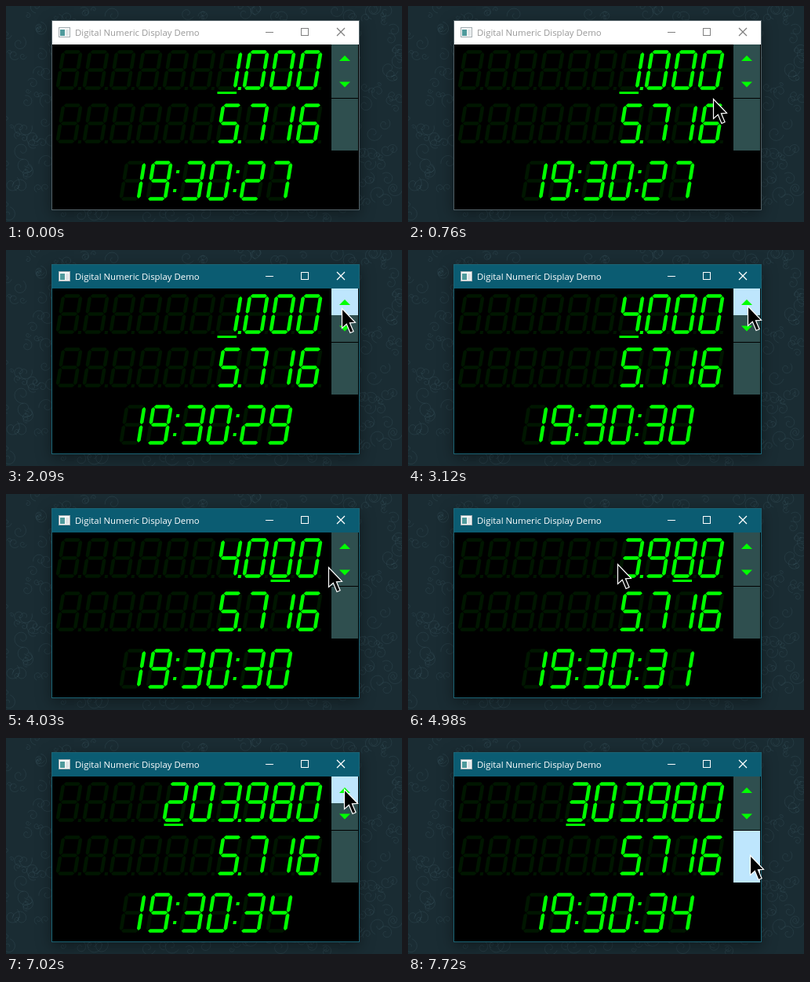
Write an HTML page with a canvas that moves like this. It is 505 px wide and 275 px high and loops after 8 s.

```html
<!DOCTYPE html>
<html lang="en">
<head>
<meta charset="utf-8">
<title>Digital Numeric Display Demo</title>
<style>
  html, body { margin: 0; width: 100%; height: 100%; overflow: hidden; background: #1a2b32; }
  canvas { display: block; }
</style>
</head>
<body>
<canvas id="stage" width="505" height="275"></canvas>
<script>
const W = 505, H = 275, LOOP = 8000;
const ctx = document.getElementById('stage').getContext('2d');
const LIT = '#00ff00', GHOST = '#001600', SLATE = '#2f4f4f', HOVER = '#bee6fd';
const COLUMNS = 10, PITCH = 34, ROW_X = 64;

// The picture advances in even steps
const STEP = 78, FIRST_STEP = 374;
const snap = t => FIRST_STEP + STEP * Math.floor((t - FIRST_STEP) / STEP);

// Pointer stops; clicks at a stop repeat at a steady rate from the first release
const CLICK_PERIOD = 250, HOLD = 100;
const stops = [
  { at: 300, x: 515, y: 290 },
  { at: 1150, x: 322, y: 27 },
  { at: 1380, x: 297, y: 28, release: 1560, clicks: 1 },
  { at: 2090, x: 428, y: 74 },
  { at: 2240, x: 433, y: 71, release: 2600, clicks: 3 },
  { at: 3410, x: 356, y: 72, release: 3585, clicks: 1 },
  { at: 4190, x: 429, y: 100, release: 4410, clicks: 2 },
  { at: 4970, x: 268, y: 89 },
  { at: 5530, x: 211, y: 85, release: 5670, clicks: 1 },
  { at: 6140, x: 415, y: 65 },
  { at: 6380, x: 431, y: 65, release: 6690, clicks: 3 },
  { at: 7700, x: 436, y: 149 }
];
const clicks = stops.flatMap(({ x, y, release, clicks = 0 }) =>
  Array.from({ length: clicks }, (_, i) => ({ x, y, up: release + i * CLICK_PERIOD })));
const leaveTime = ({ at, release, clicks }) => clicks ? release + (clicks - 1) * CLICK_PERIOD + HOLD : at;

const buttons = [49, 83, 118].map((top, i) => ({ left: 415, top, right: 449, bottom: [83, 117, 184][i] }));
const [upButton, downButton] = buttons;
const minimize = { left: 313, top: 19, right: 358, bottom: 48 };
const inside = ({ x, y }, r) => x > r.left && x <= r.right && y >= r.top && y < r.bottom;

function pointerAt(t) {
  const next = stops.findIndex(stop => stop.at > t);
  if (next < 1) return stops[next < 0 ? stops.length - 1 : 0];
  const from = stops[next - 1], to = stops[next], leave = leaveTime(from);
  const f = Math.sin(Math.max(0, (t - leave) / (to.at - leave)) * Math.PI / 2);
  return { x: Math.round(from.x + (to.x - from.x) * f), y: Math.round(from.y + (to.y - from.y) * f) };
}

function stateAt(t) {
  const state = { active: false, pressed: false, thousandths: 1000, column: 6 };
  for (const click of clicks) {
    if (t < click.up - HOLD) break;
    state.active = true;
    state.pressed = t < click.up;
    if (state.pressed) break;
    const amount = 10 ** (COLUMNS - 1 - state.column);
    if (inside(click, upButton)) state.thousandths += amount;
    else if (inside(click, downButton)) state.thousandths -= amount;
    else if (click.y > minimize.bottom) state.column = Math.floor((click.x - ROW_X) / PITCH);
  }
  return state;
}

function box(x, y, w, h, color) {
  ctx.fillStyle = color;
  ctx.fillRect(x, y, w, h);
}

function poly(points, color) {
  ctx.beginPath();
  points.forEach(([x, y]) => ctx.lineTo(x, y));
  ctx.closePath();
  ctx.fillStyle = color;
  ctx.fill();
}

function line(x1, y1, x2, y2, color, width = 1) {
  ctx.beginPath();
  ctx.moveTo(x1, y1);
  ctx.lineTo(x2, y2);
  ctx.strokeStyle = color;
  ctx.lineWidth = width;
  ctx.stroke();
}

// Seven-segment glyphs on a slanted 2 x 3 lattice of joints, numbered row by row
const CELL_W = 22.2, CELL_H = 23, SLANT = 0.165, DIGIT_H = 51;
const joints = { a: '01', b: '13', c: '35', d: '45', e: '24', f: '02', g: '23' };
const glyphs = ['abcdef', 'bc', 'abdeg', 'abcdg', 'bcfg', 'acdfg', 'acdefg', 'abc', 'abcdefg', 'abcdfg'];

function slanted(x, y, draw) {
  ctx.save();
  ctx.transform(1, 0, -SLANT, 1, x + SLANT * DIGIT_H, y);
  draw();
  ctx.restore();
}

function segment(name, color) {
  const r = 2.3, gap = 0.5;
  const [[x1, y1], [x2, y2]] = [...joints[name]].map(j => [1.2 + j % 2 * CELL_W, 2.5 + (j >> 1) * CELL_H]);
  const length = x2 - x1 + y2 - y1, ux = (x2 - x1) / length, uy = (y2 - y1) / length;
  const point = (along, across) => [x1 + ux * along + uy * across, y1 + uy * along + ux * across];
  poly([point(gap, 0), point(gap + r, r), point(length - gap - r, r),
    point(length - gap, 0), point(length - gap - r, -r), point(gap + r, -r)], color);
}

const digit = (x, y, n, color) =>
  slanted(x, y, () => [...glyphs[n]].forEach(name => segment(name, color)));

const dot = (x, y, color) => slanted(x, y, () => box(27.5, 47, 4, 4, color));

function numberRow(y, text) {
  const columnX = i => ROW_X + i * PITCH;
  for (let i = 0; i < COLUMNS; i++) {
    digit(columnX(i), y, 8, GHOST);
    dot(columnX(i), y, GHOST);
  }
  let column = COLUMNS - text.replace('.', '').length;
  for (const ch of text) {
    if (ch === '.') dot(columnX(column - 1), y, LIT);
    else digit(columnX(column++), y, +ch, LIT);
  }
}

function clockRow(y, text) {
  let x = 145;
  for (const ch of text) {
    if (ch === ':') {
      slanted(x, y, () => [12, 36].forEach(top => box(-2, top, 4, 4, LIT)));
      x += PITCH / 4;
    } else {
      digit(x, y, 8, GHOST);
      digit(x, y, +ch, LIT);
      x += PITCH;
    }
  }
}

// Faint curled wallpaper with the window's shadow, drawn once
const wallpaper = (() => {
  const canvas = document.createElement('canvas');
  canvas.width = W;
  canvas.height = H;
  const c = canvas.getContext('2d');
  c.fillStyle = '#1a2c33';
  c.fillRect(0, 0, W, H);
  let seed = 7;
  const random = () => (seed = seed * 16807 % 2147483647) / 2147483647;
  c.strokeStyle = 'rgba(90,125,135,0.17)';
  for (let i = 0; i < 420; i++) {
    const x = random() * W, y = random() * H, size = 3 + random() * 9, turn = random() * 7;
    c.beginPath();
    for (let a = 0; a < 8; a += 0.4) {
      const r = size * (1 - a / 9);
      c.lineTo(x + r * Math.cos(a + turn), y + r * Math.sin(a + turn));
    }
    c.stroke();
  }
  c.shadowColor = 'rgba(0,0,0,0.4)';
  c.shadowBlur = 18;
  c.shadowOffsetY = 5;
  c.fillRect(58, 18, 393, 242);
  return canvas;
})();

function titleBar(active, overMinimize) {
  box(58, 18, 393, 242, active ? '#1b6475' : '#526167');
  box(59, 19, 391, 30, active ? '#0b5c72' : '#ffffff');
  box(67, 27, 15, 13, '#a4adb1');
  box(68, 28, 13, 11, '#f8fafa');
  box(69, 30, 6, 8, '#4f9a9c');
  box(76, 30, 4, 8, '#dfe5e7');

  ctx.fillStyle = active ? '#ffffff' : '#999999';
  ctx.font = '11.4px "Open Sans", sans-serif';
  ctx.fillText('Digital Numeric Display Demo', 88, 38);

  if (overMinimize) box(313, 19, 45, 29, active ? 'rgba(255,255,255,.1)' : '#e5e5e5');
  const ink = active ? '#ffffff' : '#808080';
  line(331, 33.5, 341, 33.5, overMinimize && !active ? '#000000' : ink);
  ctx.strokeStyle = ink;
  ctx.strokeRect(376.5, 28.5, 9, 9);
  line(422, 28, 432, 38, ink, 1.2);
  line(432, 28, 422, 38, ink, 1.2);
}

function pointer({ x, y }) {
  ctx.save();
  ctx.translate(x + 0.5, y + 0.5);
  poly([[0, 0], [0, 25], [5.8, 19.7], [10.5, 31], [14.6, 29.2], [9.9, 18.3], [17, 17.8]], '#000000');
  ctx.strokeStyle = '#ffffff';
  ctx.lineWidth = 1.2;
  ctx.stroke();
  ctx.restore();
}

function clickMark({ x, y }) {
  ctx.beginPath();
  ctx.arc(x, y, 12, 0, Math.PI * 2);
  ctx.fillStyle = 'rgba(255,255,0,.47)';
  ctx.fill();
}

function render(t) {
  const tip = pointerAt(t), state = stateAt(t);

  ctx.drawImage(wallpaper, 0, 0);
  titleBar(state.active, inside(tip, minimize));
  box(59, 49, 391, 210, '#000000');

  for (const b of buttons)
    box(b.left, b.top, b.right - b.left, b.bottom - b.top, inside(tip, b) ? HOVER : SLATE);
  for (const [base, apex] of [[70, 63], [96.5, 103.5]])
    poly([[425, base], [432, apex], [439, base]], LIT);

  numberRow(56, (state.thousandths / 1000).toFixed(3));
  box(ROW_X + 1.5 + state.column * PITCH, 109, 24.5, 3, LIT);
  numberRow(124, '5.716');
  clockRow(197, '19:30:' + (27 + Math.max(0, Math.floor(t / 1000))));

  if (t >= FIRST_STEP) pointer(tip);
  if (state.pressed) clickMark(tip);
}

function tick() {
  render(snap(performance.now() % LOOP));
  requestAnimationFrame(tick);
}
tick();
</script>
</body>
</html>
```
